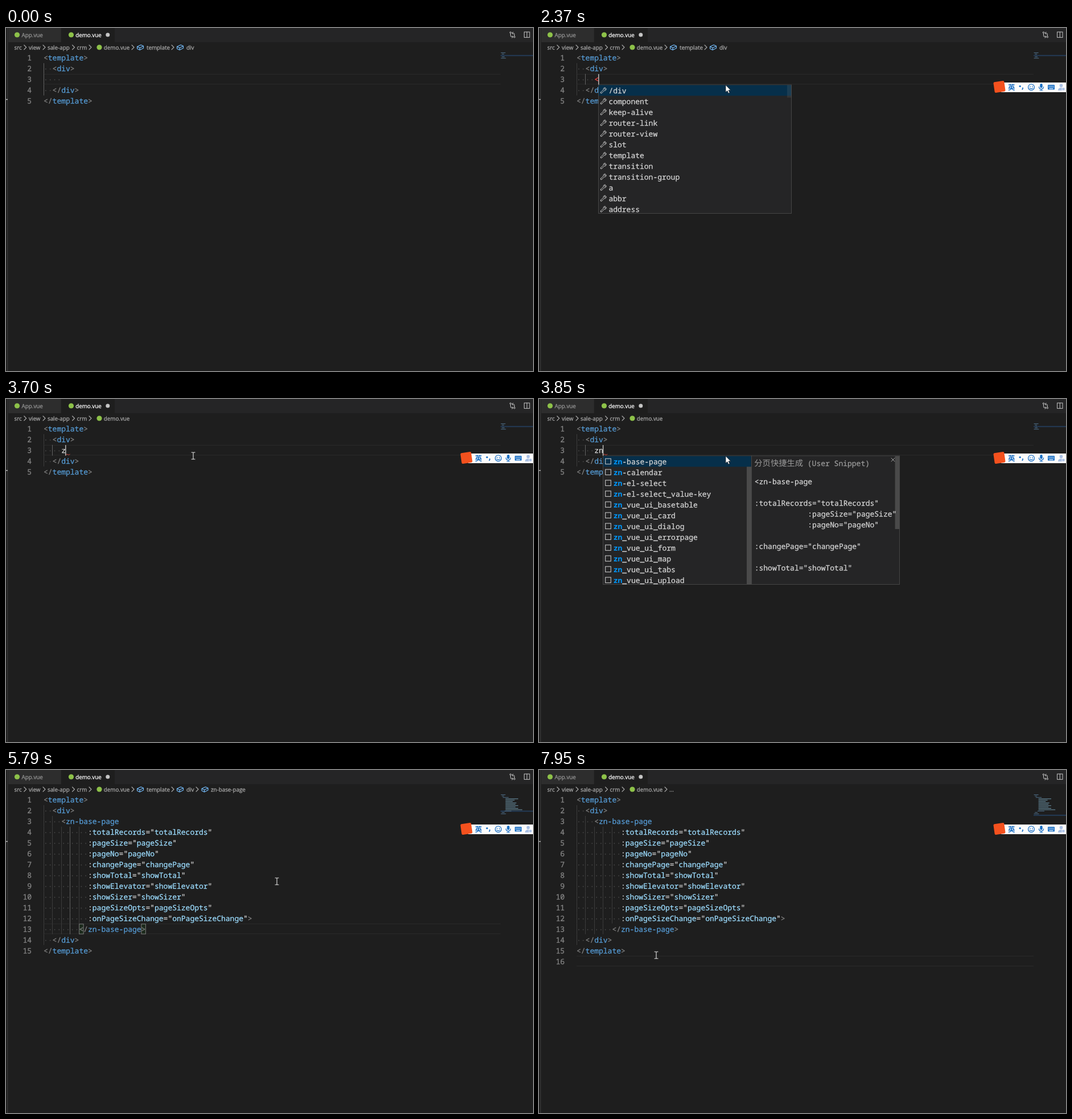
Write an HTML page that moves like this. It is 926x604 px and loops after 8000 ms.

```html
<!DOCTYPE html>
<html lang="en">
<head>
<meta charset="utf-8">
<title>Snippet demo</title>
<style>
  html, body { margin: 0; width: 100%; height: 100%; overflow: hidden; background: #1e1e1e; }
  svg { display: block; width: 100vw; height: 100vh; }
  text { white-space: pre; text-rendering: geometricPrecision; stroke-width: .28; }
  .m { font: 13px "Noto Sans Mono", "DejaVu Sans Mono", monospace; }
  .b { font: 700 13px "Noto Sans Mono", "DejaVu Sans Mono", monospace; stroke-width: 0; }
  .u { font: 9.8px "Open Sans", "Noto Sans", sans-serif; }
  .c { font: 14.3px "Noto Sans CJK SC", "Noto Sans CJK", "Noto Sans CJK JP", sans-serif; stroke-width: 0; }
  .l { fill: none; stroke-linecap: round; stroke-linejoin: round; }
</style>
</head>
<body>
<svg viewBox="0 0 926 604" preserveAspectRatio="none">
  <g id="base"></g>
  <g id="scene"></g>
  <rect id="caret" width="1.4" height="18.6" fill="#c4c4c2"/>
  <g id="mouse"></g>
</svg>
<script>
const LOOP = 8000, LEFT = 66, CHAR = 7.8, ROW = 18.95, TOP = 43.5;
const GREY = '#808080', TAG = '#569cd6', ATTR = '#9cdcfe', PLAIN = '#d4d4d4';
const $ = id => document.getElementById(id);

const rect = (x, y, w, h, fill, more = '') =>
  `<rect x="${x}" y="${y}" width="${w}" height="${h}" fill="${fill}" ${more}/>`;
const circle = (x, y, r, fill, more = '') =>
  `<circle cx="${x}" cy="${y}" r="${r}" fill="${fill}" ${more}/>`;
const line = (d, stroke, w = 1) =>
  `<path class="l" d="${d}" stroke="${stroke}" stroke-width="${w}"/>`;
const text = (x, y, s, fill, cls = 'm', more = '') =>
  `<text class="${cls}" x="${x}" y="${y}" fill="${fill}" stroke="${fill}" ${more}>${s.replace(/</g, '&lt;')}</text>`;
const group = (x, y, s) => `<g transform="translate(${x} ${y})">${s}</g>`;

const colX = c => LEFT + CHAR * c;
const rowY = n => TOP + ROW * (n - 1);
const baseY = n => Math.round(57.4 + ROW * (n - 1));
// last entry of a [time, ...values] table that has started
const at = (table, t) => table.filter(e => e[0] <= t).pop();

/* ---------- document ---------- */
const attrs = ['totalRecords', 'pageSize', 'pageNo', 'changePage', 'showTotal',
  'showElevator', 'showSizer', 'pageSizeOpts', 'onPageSizeChange'];
const wrap = inner => ['<template>', '  <div>', ...inner, '  </div>', '</template>'];
const snippet = ['    <zn-base-page',
  ...attrs.map((a, i) => `${' '.repeat(10)}:${a}="${a}"${i === 8 ? '>' : ''}`),
  '        </zn-base-page>'];

const docs = [
  [0, wrap(['    '])], [2370, wrap(['    <'])], [3380, wrap(['    '])],
  [3700, wrap(['    z'])], [3770, wrap(['    zn'])],
  [4710, wrap(snippet)], [7090, [...wrap(snippet), '']]
];
// time, column, row
const carets = [[0, 4, 3], [2370, 5, 3], [3380, 4, 3], [3700, 5, 3], [3770, 6, 3],
  [4710, 23, 13], [6470, 11, 15], [7090, 0, 16]];
const blink = [[0, 0], [900, 1],
  [1530, .66], [1610, .33], [1680, 0], [2140, .5], [2220, 1],
  [3000, .66], [3080, .33], [3150, 0], [3380, 1],
  [4480, .5], [4560, 0], [4710, 1],
  [5320, .66], [5400, .33], [5480, 0], [6470, 1],
  [7780, .66], [7860, .33], [7950, 0]];
const trails = [[0, 'template', 'div'], [2680], [4160, 'template', 'div'],
  [5090, 'template', 'div', 'zn-base-page'], [6630, 'template'], [7550, '...']];
// active indent guide: time, column, first row, last row
const guides = [[0, 0, 2, 4], [2370, 2, 3, 3], [3380, 0, 2, 4], [3700, 2, 3, 3],
  [4710, 6, 4, 13], [6470, -1, 0, 0]];
const squiggles = [[0, -1], [3380, 4], [3700, 5], [3770, 6], [3930, -1]];

function codeLine(src, n) {
  const body = src.trimStart(), pad = src.length - body.length, y = baseY(n);
  const word = body[0] === ':' ? ATTR : body[0] === '<' ? TAG : PLAIN;
  let out = '';
  for (let c = 0; c < pad; c++) out += circle(colX(c + .5), y - 3.8, 1, '#434343');
  for (const m of body.matchAll(/(<\/?|>)|([:="]+)|[\w-]+/g)) {
    const fill = m[1] ? (body === '<' ? '#f44747' : GREY) : m[2] ? PLAIN : word;
    out += text(colX(pad + m.index), y, m[0], fill);
  }
  return out + text(45, y, String(n), '#858585', 'm', 'text-anchor="end"');
}

function indentGuides(lines, active) {
  let out = '';
  lines.forEach((src, i) => {
    const n = i + 1, blank = !src.trim();
    const pad = blank ? Math.min(2, src.length) : src.search(/\S/);
    for (let c = 0; c < pad; c += 2) {
      const on = c === active[1] && n >= active[2] && n <= active[3];
      out += rect(Math.floor(colX(c)), rowY(n) - .6, 1, ROW, on ? '#626262' : '#3c3c3c');
    }
  });
  return out;
}

function minimap(lines, row) {
  let out = rect(869, 47.6 + 2.4 * (row - 3), 57, 1.8, '#243e5c');
  lines.forEach((src, i) => {
    const body = src.trim(), pad = src.length - src.trimStart().length;
    if (!body) return;
    out += rect(869.6 + pad * .8, 43 + 2.4 * i, body.length * .8, 1.1,
      body[0] === ':' ? '#668b9d' : '#4c6a83');
  });
  return out;
}

/* ---------- breadcrumbs ---------- */
const chevron = x => line(`M${x - 2} 30l4 4l-4 4`, '#a9a9a9', 1.1);
const cube = x => group(x, 34,
  line('M-5.5 -1.2L1 -4.3L5.5 -2.2V1.6L-1 4.7L-5.5 2.4ZM-5.5 -1.2L-1 1L5.5 -2.2M-1 1V4.7', '#75beff', 1.1));
const crumb = (x, s) => text(x, 38, s, '#a9a9a9', 'u');

function trail(parts) {
  if (!parts.length) return '';
  if (parts[0] === '...') return chevron(223) + crumb(229, '...');
  const spots = [[223, 236, 247], [293, 306, 317], [336, 349.5, 360]];
  return parts.map((p, i) => {
    const [a, b, c] = spots[i];
    return chevron(a) + cube(b) + crumb(c, p);
  }).join('');
}

/* ---------- suggestion popups ---------- */
const tags = '/div component keep-alive router-link router-view slot template transition transition-group a abbr address'.split(' ');
const snippets = ['-base-page', '-calendar', '-el-select', '-el-select_value-key',
  ...'basetable card dialog errorpage form map tabs upload'.split(' ').map(s => '_vue_ui_' + s)];
const itemY = i => Math.round(115.2 + ROW * i);
const panel = (x, w) => rect(x + .5, 100, w - 1, 226.5, '#252526', 'stroke="#454545"');
const wrench = (x, y) => group(x, y,
  line('M-4.6 3.2L.2 -1.4C-.5 -3.8 1.6 -5.6 3.8 -4.8L1.8 -2.8L3 -1.6L5 -3.5C5.7 -1.2 3.8 .8 1.6 .2L-3 5Q-5.6 5.4 -4.6 3.2Z', '#c5c5c5', 1));

function tagList() {
  return panel(104, 340) + rect(105, 100.5, 338, 18.8, '#062f4a') +
    rect(436, 100.5, 7.5, 22, '#797979', 'opacity=".18"') +
    tags.map((s, i) => wrench(113, itemY(i) - 5) + text(122.4, itemY(i), s, PLAIN)).join('');
}

function snippetList() {
  const items = snippets.map((s, i) => {
    const y = itemY(i);
    return rect(116.7, y - 10, 9.6, 9.6, 'none', 'stroke="#c5c5c5" stroke-width="1.1"') +
      text(130.7, y, 'zn', '#0097fb', 'b') + text(130.7 + 2 * CHAR, y, s, PLAIN);
  }).join('');
  const help = [[0, 150, '<zn-base-page'], [0, 188, ':totalRecords="totalRecords"'],
    [12, 207, ':pageSize="pageSize"'], [12, 226, ':pageNo="pageNo"'],
    [0, 264, ':changePage="changePage"'], [0, 302, ':showTotal="showTotal"']];
  return panel(112, 262) + rect(113, 100.5, 259.5, 18.8, '#062f4a') +
    rect(365, 119.3, 8, 207, '#4a4a4a') + items +
    panel(373, 261) + rect(625.6, 100.5, 8, 128.5, '#4a4a4a') +
    text(378.3, 118, '分页快捷生成', '#9a9a9a', 'c') + text(471.8, 118, '(User Snippet)', '#9a9a9a') +
    help.map(([c, y, s]) => text(378.7 + c * CHAR, y, s, PLAIN)).join('') +
    line('M619 104l6 6M625 104l-6 6', '#a0a0a0', 1);
}

/* ---------- input method bar ---------- */
function inputBar() {
  const blue = '#1a6fc4', pale = '#a9c0e4';
  let keys = rect(894, 100, 12, 8.6, blue, 'rx="1"');
  for (let i = 0; i < 8; i++) keys += rect(895.6 + i % 4 * 2.5, 101.6 + (i >> 2) * 2.1, 1.3, 1.1, '#fff');
  return rect(812, 96, 114, 17, '#fcfcfc') +
    rect(-9.5, -9.5, 19, 19, '#f4511e', 'rx="2" transform="translate(809 103.5) rotate(-8)"') +
    text(824, 109, '英', blue, 'c', 'style="font-size:12.5px;font-weight:700"') +
    circle(845.2, 102.6, 1.7, blue) + line('M850 105.4q.6 1.4 -.8 2.6', blue, 1.7) +
    circle(865, 104.2, 5.4, 'none', `stroke="${blue}" stroke-width="1.3"`) +
    circle(863, 102.8, .9, blue) + circle(867, 102.8, .9, blue) + line('M862.3 105.6q2.7 2.7 5.4 0', blue, 1.1) +
    rect(880.3, 98, 4.4, 7.6, blue, 'rx="2.2"') + line('M878.4 103.6q.3 4 4.1 4t4.1 -4M882.5 107.6v2.4M880 110h5', blue, 1.1) +
    keys + rect(896.5, 106.2, 7, 1.1, '#fff') +
    circle(917.5, 101.4, 2.8, pale) + `<path d="M912 110q0 -5 5.5 -5t5.5 5Z" fill="${pale}"/>` +
    rect(919, 105, 5, 5, pale, 'rx="1" stroke="#fff" stroke-width=".7"');
}

/* ---------- fixed window parts ---------- */
function chrome() {
  const mark = (x, y) => circle(x, y, 4.6, '#8dc149');
  const pale = '#c5c5c5';
  return rect(0, 0, 926, 604, '#1e1e1e') + rect(4, 0, 922, 25, '#252526') +
    rect(4, 0, 92.5, 25, '#2d2d2d') + rect(97, 0, 94, 25.2, '#1e1e1e') +
    rect(2.2, 0, 1, 604, '#414141') + rect(0, 125.2, 3, 1.3, '#c8c8c8') +
    mark(19.5, 12) + text(27.6, 16, 'App.vue', '#969696', 'u') +
    mark(114.5, 12) + text(122.2, 16, 'demo.vue', '#fff', 'u') + circle(178.8, 12, 3.5, pale) +
    line('M886.5 8.5v5q0 2 2 2h2M889 13.5l2 2l-2 2M893.3 15.5v-4.5q0 -2 -2 -2h-2M891 7l-2 2l2 2', pale, 1) +
    circle(886.5, 8, 1.3, '#252526', `stroke="${pale}"`) + circle(893.3, 15.7, 1.3, '#252526', `stroke="${pale}"`) +
    rect(910.6, 7, 9.4, 9.6, 'none', `stroke="${pale}"`) + line('M915.3 7v9.6', pale) +
    crumb(14.6, 'src') + chevron(33.7) + crumb(40, 'view') + chevron(67) + crumb(73, 'sale-app') +
    chevron(118.5) + crumb(124.6, 'crm') + chevron(148) + mark(164, 34) + crumb(171.8, 'demo.vue');
}

/* ---------- scene ---------- */
function scene(t) {
  const lines = at(docs, t)[1], row = at(carets, t)[2], y = rowY(row), sq = at(squiggles, t)[1];
  let out = minimap(lines, row) +
    rect(LEFT, y - .5, 803, 1, '#2b2b2b') + rect(LEFT, y + ROW - 2, 803, 1, '#2b2b2b');
  out += indentGuides(lines, at(guides, t));
  if (row === 13) out += [8, 22].map(c =>
    rect(colX(c) + .3, y + .3, 7.4, 17.6, '#1c2a1c', 'stroke="#888" stroke-width=".9"')).join('');
  out += lines.map((s, i) => codeLine(s, i + 1)).join('') + trail(at(trails, t).slice(1));
  if (sq >= 0) out += line(`M${colX(sq)} 98.6q1.6 -2.6 3.4 -.8t3.8 -.4`, '#d8483f', 1);
  if (t >= 900) out += inputBar();
  if (t >= 2370 && t < 3380) out += tagList();
  if (t >= 3850 && t < 4710) out += snippetList();
  return out;
}

/* ---------- mouse ---------- */
const path = [[750, 188, 90], [1220, 262, 95], [1300, 329, 100], [5790, 476, 196], [5870, 505, 290],
  [5940, 470, 368], [6020, 400, 401], [6100, 318, 388], [6170, 258, 358], [6250, 220, 336], [6320, 206, 326]];
const beam = line('M-3 -6h2q1 0 1 1q0 -1 1 -1h2M0 -5v10M-3 6h2q1 0 1 -1q0 1 1 1h2', '#e4e4e4', 1.1);
const arrow = '<path d="M0 0V12.6L2.9 9.9L4.9 14.4L7 13.5L5 9.1H8.8Z" fill="#fff" stroke="#111" stroke-width=".6"/>';

function mouse(t) {
  if (t < 130) return '';
  let [, x, y] = at(path, t) || [];
  if (t < 750) {
    const p = Math.floor((t - 130) / 77.5) / 8, e = p * p * (3 - 2 * p);
    x = 650 + (188 - 650) * e;
    y = 435 + (90 - 435) * e;
  }
  const press = (t >= 900 && t < 1070) || (t >= 6470 && t < 6550);
  const over = (t >= 2370 && t < 3380) || (t >= 3850 && t < 4710);
  return (press ? circle(x - 2.2, y - .4, 9.5, '#8f870f') : '') +
    (over ? group(328, 100.5, arrow) : group(x, y, beam));
}

/* ---------- playback ---------- */
const shown = {};
function put(id, html) {
  if (shown[id] !== html) $(id).innerHTML = shown[id] = html;
}

function draw(t) {
  const [, col, row] = at(carets, t), caret = $('caret');
  put('scene', scene(t));
  put('mouse', mouse(t));
  caret.setAttribute('x', Math.max(LEFT, colX(col) - .9));
  caret.setAttribute('y', rowY(row) - .3);
  caret.setAttribute('opacity', at(blink, t)[1]);
}

put('base', chrome());
draw(0);
let start;
requestAnimationFrame(function tick(now) {
  start ??= now;
  draw(Math.max(0, now - start) % LOOP);
  requestAnimationFrame(tick);
});
</script>
</body>
</html>
```
